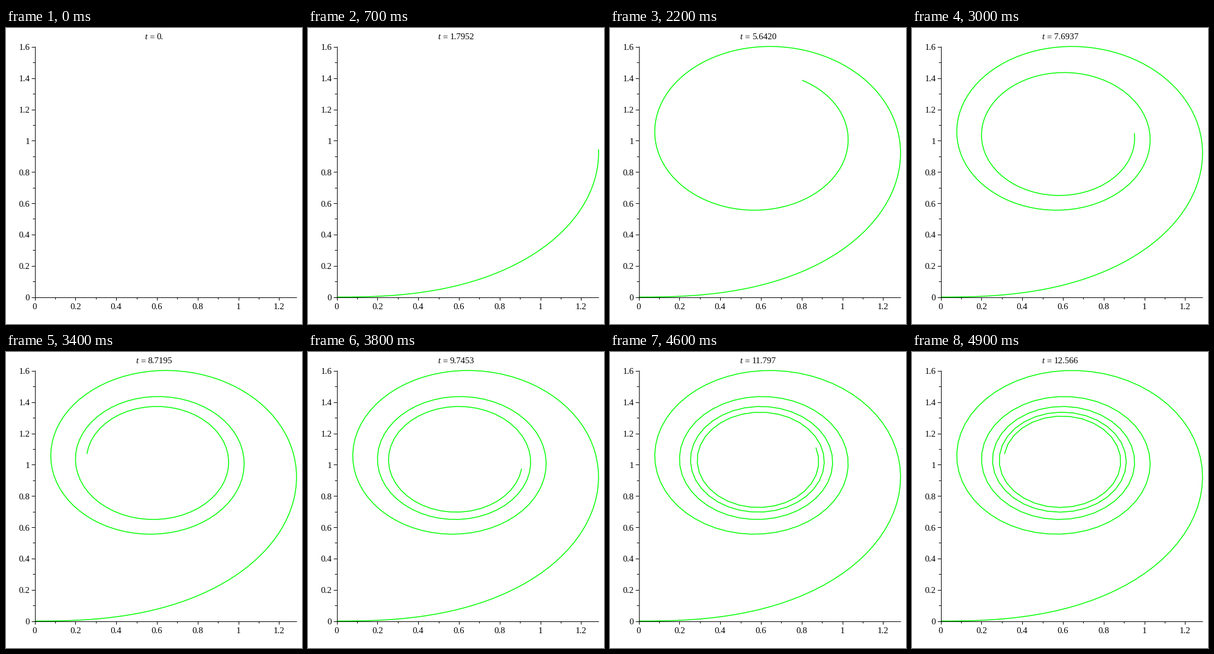
Animation of 500 by 500 pixels, one loop 5000 ms. Source, as a matplotlib script:

```python
import numpy as np
import matplotlib.pyplot as plt
from matplotlib.animation import FuncAnimation

SIZE, DPI = 500, 100
FRAMES, INTERVAL = 50, 100
T_END = 4 * np.pi
SAMPLES = 200
PT = 72 / DPI                      # points per pixel
EM = 15                            # font size in pixels
LEFT, RIGHT, TOP, BOTTOM = 48.5, 490.8, 31.2, 454.5

plt.rcParams["font.family"] = "Liberation Serif"


def running_integral(values, step):
    return np.concatenate([[0], np.cumsum((values[1:] + values[:-1]) * step / 2)])


# Spiral whose curvature is the square root of its arc length
arc = np.linspace(0, T_END, 40001)
heading = 2 / 3 * arc ** 1.5
curve_x = running_integral(np.cos(heading), arc[1])
curve_y = running_integral(np.sin(heading), arc[1])
scale_x = (RIGHT - LEFT) / curve_x.max()
scale_y = (BOTTOM - TOP) / curve_y.max()


def to_px(x, y):
    return LEFT + scale_x * x, BOTTOM - scale_y * y


fig = plt.figure(figsize=(SIZE / DPI, SIZE / DPI), dpi=DPI, facecolor="white")
ax = fig.add_axes([0, 0, 1, 1])
ax.set_xlim(0, SIZE)
ax.set_ylim(SIZE, 0)
ax.axis("off")


def rule(x0, y0, x1, y1):
    ax.plot([x0, x1], [y0, y1], color="black", lw=PT, zorder=3,
            solid_capstyle="butt")


def label(x, y, text, **style):
    return ax.text(x, y, text, fontsize=EM * PT, color="black",
                   va="baseline", zorder=4, **style)


rule(LEFT, TOP, LEFT, BOTTOM + 0.5)
rule(LEFT - 0.5, BOTTOM, RIGHT, BOTTOM)

for i in range(13):
    x, _ = to_px(i / 10, 0)
    major = i % 2 == 0
    rule(x, BOTTOM, x, BOTTOM + (5.5 if major else 3.5))
    if major:
        label(x, 475, f"{i / 10:g}", ha="center")

for i in range(17):
    _, y = to_px(0, i / 10)
    major = i % 2 == 0
    rule(LEFT - (5.5 if major else 3.5), y, LEFT, y)
    if major:
        label(40.2, y + 5.5, f"{i / 10:g}", ha="right")

curve, = ax.plot([], [], color="#00ff00", lw=1.5 * PT, zorder=2,
                 solid_joinstyle="round", solid_capstyle="butt")
name = label(0, 19, "t", style="italic")
equals = label(0, 19, "=")
number = label(0, 19, "")


def draw(frame):
    t = T_END * frame / (FRAMES - 1)
    s = np.linspace(0, t, SAMPLES)
    x, y = to_px(np.interp(s, arc, curve_x), np.interp(s, arc, curve_y))
    curve.set_data(x, y)
    curve.set_visible(frame > 0)

    value = f"{t:#.5g}" if frame else "0."
    width = 20 + EM * (0.5 * len(value) - 0.25)
    start = 250.2 - width / 2
    number.set_text(value)
    for part, offset in ((name, 0), (equals, 7.5), (number, 20)):
        part.set_x(start + offset)
    return curve, name, equals, number


anim = FuncAnimation(fig, draw, frames=FRAMES, interval=INTERVAL,
                     repeat=True, repeat_delay=0, blit=False)
plt.show()
```
